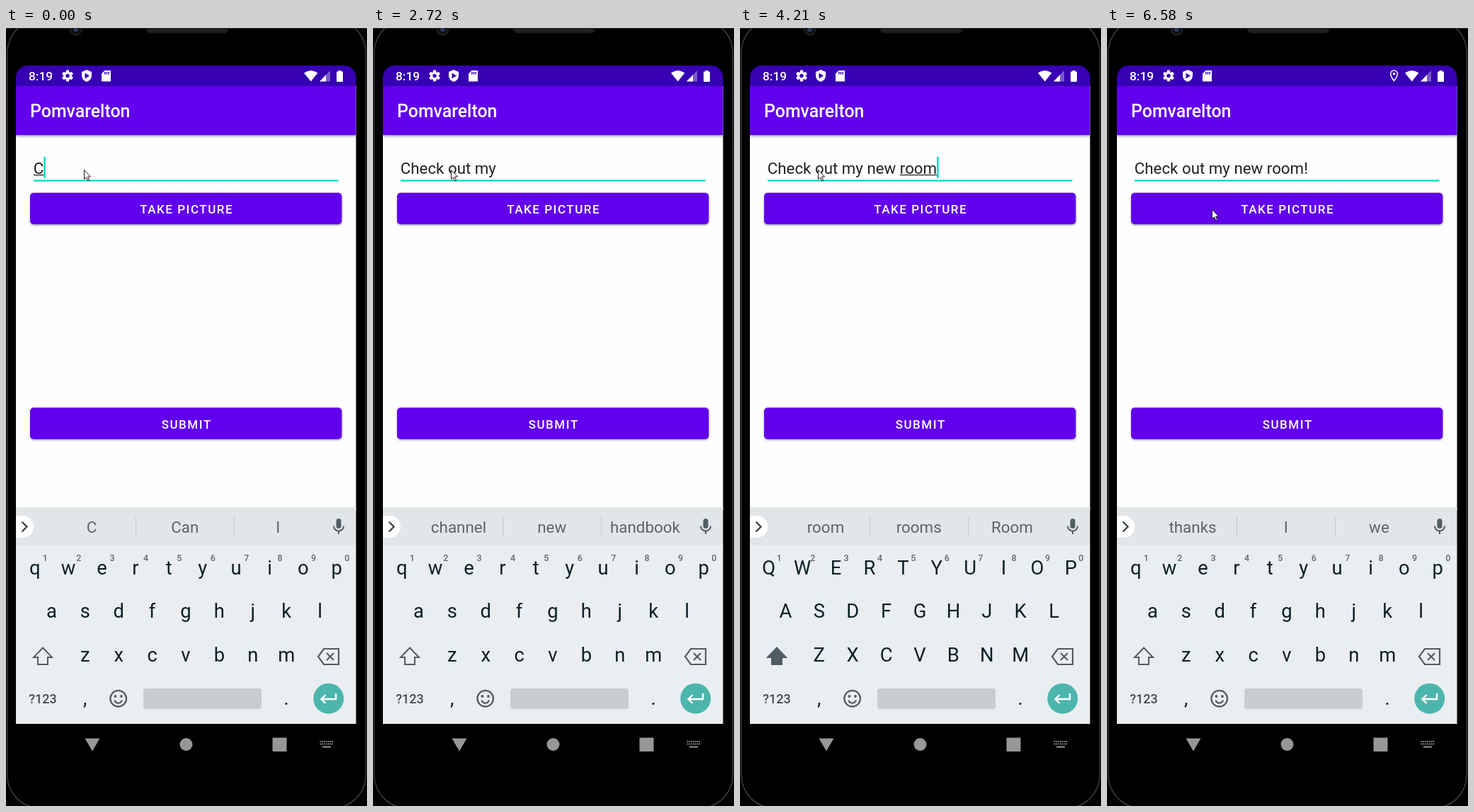
These frames come from a looping animation (510x1099 px, 8 s). An HTML page with a canvas:

```html
<!DOCTYPE html>
<html lang="en">
<head>
<meta charset="utf-8">
<title>New post</title>
<style>
html, body { margin: 0; width: 100%; height: 100%; overflow: hidden; background: #000; }
canvas { display: block; width: 510px; height: 1099px; }
</style>
</head>
<body>
<canvas id="stage" width="510" height="1099"></canvas>
<script>
const g = document.getElementById('stage').getContext('2d');
const LOOP = 8000;
const PURPLE = '#6200ee', DARK_PURPLE = '#3700b3', TEAL = '#03dac5';
const ICON = '#515d64', KEY = '#0c1f28';
const MID = 254, KEY_STEP = 47.4;

// time, typed text, suggestions (a leading * marks the bold one)
const typing = [
  [0, 'C', 'C', 'Can', 'I'],
  [250, 'Ch', 'Ch', 'Check', 'Chocolate'],
  [380, 'Che', 'Che', '*Check', 'Cheese'],
  [520, 'Chec', 'Chec', '*Check', 'Checking'],
  [650, 'Check', 'Check', 'Checks', 'Checked'],
  [960, 'Check ', 'in', 'with', 'out'],
  [1390, 'Check o', 'o', 'on', 'of'],
  [1660, 'Check out', 'out', 'outer', 'outta'],
  [1800, 'Check out ', 'the', 'my', 'this'],
  [2050, 'Check out m', 'm', '*my', 'more'],
  [2170, 'Check out my', 'my', 'mine', 'myself'],
  [2290, 'Check out my ', 'channel', 'new', 'handbook'],
  [3000, 'Check out my n', 'n', 'new', 'next'],
  [3270, 'Check out my ne', 'ne', '*new', 'next'],
  [3390, 'Check out my new', 'new', 'news', 'newest'],
  [3520, 'Check out my new ', 'channel', 'blog', 'website'],
  [3670, 'Check out my new r', 'r', 'red', 'room'],
  [3820, 'Check out my new ro', 'ro', 'road', 'room'],
  [3960, 'Check out my new roo', 'roo', '*roof', 'room'],
  [4080, 'Check out my new room', 'room', 'rooms', 'Room'],
  [4360, 'Check out my new room!', 'thanks', 'I', 'we']
];
const pointer = [[0, 110, 200], [5050, 135, 230], [5320, 139.5, 240], [5470, 148, 256]];
const caretOff = [[2720, 3000], [4760, 5320], [5730, LOOP]];

const at = (steps, t) => steps.filter(s => s[0] <= t).pop();
const within = (t, a, b) => t >= a && t < b;

function rect(x, y, w, h, color, r = 0) {
  g.fillStyle = color;
  g.beginPath();
  g.roundRect(x, y, w, h, r);
  g.fill();
}

function disc(x, y, r, color) {
  g.fillStyle = color;
  g.beginPath();
  g.arc(x, y, r, 0, 7);
  g.fill();
}

function trace(points, closed) {
  g.beginPath();
  points.forEach(([x, y]) => g.lineTo(x, y));
  if (closed) g.closePath();
}

function poly(points, color) {
  trace(points, true);
  g.fillStyle = color;
  g.fill();
}

function line(points, color, width, closed) {
  trace(points, closed);
  g.strokeStyle = color;
  g.lineWidth = width;
  g.stroke();
}

function label(s, x, y, size, color, weight = 400, align = 'center', spacing = 0) {
  g.font = `${weight} ${size}px Roboto, sans-serif`;
  g.letterSpacing = spacing + 'px';
  g.textAlign = align;
  g.fillStyle = color;
  g.fillText(s, x, y);
}

function shadow(color, blur, dy, draw) {
  g.save();
  g.shadowColor = color;
  g.shadowBlur = blur;
  g.shadowOffsetY = dy;
  draw();
  g.restore();
}

function phone() {
  rect(0, 0, 510, 1099, '#000');
  rect(1, -13, 508, 1116, '#3b3b3d', 48);
  rect(2.5, -11, 505, 1112, '#000', 46);
  rect(0, 0, 510, 1, '#2a2a2b');
  disc(98.5, 2, 9, '#1b1c20');
  disc(98.5, 2, 6, '#0b0c12');
  disc(98.5, 2, 3.5, '#29365c');
  rect(198, -6, 116, 13.5, '#1d1d1e', 6);
  for (let i = 0; i < 36; i++) rect(202 + i * 3, 1 + i % 2 * 2, 1.5, 1.5, '#333');

  const gray = '#979797';
  poly([[111.5, 1003.5], [132.5, 1003.5], [122, 1021.5]], gray);
  disc(254.5, 1012, 9, gray);
  rect(376.5, 1002.5, 20, 19.5, gray, 1);
  for (let i = 0; i < 7; i++) {
    rect(443.5 + i * 2.8, 1007, 1.8, 1.8, gray);
    rect(443.5 + i * 2.8, 1010.5, 1.8, 1.8, gray);
  }
  rect(447, 1014.5, 12, 2, gray);
}

function statusBar(t) {
  rect(14, 53, 480.5, 34, DARK_PURPLE, [17, 17, 0, 0]);
  label('8:19', 32, 74, 17.3, '#fff', 500, 'left');

  g.save();
  g.translate(87, 67.5);
  for (let i = 0; i < 3; i++) {
    rect(-2.2, -8, 4.4, 16, '#fff', 1);
    g.rotate(Math.PI / 3);
  }
  g.restore();
  disc(87, 67.5, 5.8, '#fff');
  disc(87, 67.5, 2.7, DARK_PURPLE);

  g.fillStyle = '#fff';
  g.beginPath();
  g.moveTo(114, 59);
  g.lineTo(121, 62);
  g.lineTo(121, 67);
  g.quadraticCurveTo(121, 73.5, 114, 76);
  g.quadraticCurveTo(107, 73.5, 107, 67);
  g.lineTo(107, 62);
  g.fill();
  poly([[111.5, 63.5], [118, 67.5], [111.5, 71.5]], DARK_PURPLE);

  poly([[139.5, 60], [148, 60], [148, 75.5], [135, 75.5], [135, 64.5]], '#fff');
  for (let i = 0; i < 3; i++) rect(139 + i * 2.7, 62, 1.5, 3.5, DARK_PURPLE);

  g.fillStyle = '#fff';
  g.beginPath();
  g.moveTo(430.7, 75.5);
  g.lineTo(421, 63.5);
  g.quadraticCurveTo(430.7, 56.5, 440.4, 63.5);
  g.fill();
  poly([[458, 60], [458, 75.5], [443, 75.5]], 'rgba(255,255,255,.35)');
  poly([[452, 66.2], [452, 75.5], [443, 75.5]], '#fff');
  rect(467, 61.5, 9, 14.5, '#fff', 1);
  rect(469.5, 60, 4, 2, '#fff');

  if (t >= 6580) {
    g.strokeStyle = '#fff';
    g.lineWidth = 1.5;
    g.beginPath();
    g.arc(405.5, 64.7, 4.8, Math.PI, 0);
    g.quadraticCurveTo(410.3, 68.5, 405.5, 74.5);
    g.quadraticCurveTo(400.7, 68.5, 400.7, 64.7);
    g.stroke();
    disc(405.5, 64.7, 1.8, '#fff');
  }
}

function button(text, y, h, raised) {
  shadow('rgba(0,0,0,.35)', raised ? 6 : 3, raised ? 3 : 1.5,
    () => rect(34, y, 440.4, h, PURPLE, 5));
  label(text, MID + 1.2, y + 29.3, 17, '#fff', 500, 'center', 1.54);
}

function ripple(t) {
  if (!within(t, 5730, 6580)) return;
  g.save();
  g.beginPath();
  g.roundRect(34, 232.7, 440.4, 44.6, 5);
  g.clip();
  rect(34, 232, 441, 46, `rgba(255,255,255,${t < 5870 ? .08 : .17})`);
  if (t < 5870) disc(185, 256, 130, 'rgba(255,255,255,.14)');
  g.restore();
}

function field(text, t) {
  const x = 38.8, base = 206;
  label(text, x, base, 22.3, '#212121', 400, 'left');
  const end = x + g.measureText(text).width;
  if (!/[ !]$/.test(text)) {
    const start = x + g.measureText(text.slice(0, text.lastIndexOf(' ') + 1)).width;
    rect(start, 207, end - start, 1.3, '#212121');
  }
  rect(39, 214.4, 430.5, 2.4, TEAL);
  if (!caretOff.some(([a, b]) => within(t, a, b))) rect(end, 182, 2.5, 30, TEAL);
}

function suggestions(words) {
  rect(14, 677, 480.5, 55, '#e2e6e9');
  words.forEach((w, i) => {
    const bold = w[0] === '*';
    label(bold ? w.slice(1) : w, 121 + i * 131.7, 713, 22.4,
      bold ? '#000' : '#5b656b', bold ? 700 : 400);
  });
  rect(183, 690, 1, 29, '#c3c8cc');
  rect(322, 690, 1, 29, '#c3c8cc');
  rect(14, 689, 25, 31, '#fff', [0, 15, 15, 0]);
  line([[22.5, 697.5], [29.5, 704.5], [22.5, 711.5]], '#37434a', 2.3);

  rect(466.5, 693, 7, 14, ICON, 3.5);
  g.strokeStyle = ICON;
  g.lineWidth = 2;
  g.beginPath();
  g.arc(470, 703.5, 7, 0, Math.PI);
  g.stroke();
  rect(469, 710, 2, 5, ICON);
}

function keyRow(keys, y, size = 27.4, color = KEY, weight = 400, shift = 0) {
  const x = MID + shift - (keys.length - 1) / 2 * KEY_STEP;
  [...keys].forEach((c, i) => label(c, x + i * KEY_STEP, y, size, color, weight));
}

function keyboard(upper) {
  rect(14, 731, 480.5, 252, '#eaeef1');
  ['qwertyuiop', 'asdfghjkl', 'zxcvbnm', ',     .'].forEach((row, i) =>
    keyRow(upper ? row.toUpperCase() : row, 771.5 + i * 61.5, 27.4));
  keyRow('1234567890', 753, 12.5, '#5f696f', 500, 14.6);

  const arrow = [[52, 875.5], [65, 889], [59, 889], [59, 899], [45, 899], [45, 889], [39, 889]];
  if (upper) poly(arrow, ICON);
  line(arrow, ICON, 2, true);
  line([[441, 888], [449, 877], [470, 877], [470, 899], [449, 899]], ICON, 2.2, true);
  line([[453, 883], [463, 893]], ICON, 2.2);
  line([[463, 883], [453, 893]], ICON, 2.2);

  label('?123', 52, 953.5, 18, '#414d54', 500);

  g.strokeStyle = ICON;
  g.lineWidth = 2.3;
  g.beginPath();
  g.arc(158.7, 947.2, 11.3, 0, 7);
  g.stroke();
  disc(154.4, 944, 1.9, ICON);
  disc(163, 944, 1.9, ICON);
  g.beginPath();
  g.arc(158.7, 948, 5.6, .3, Math.PI - .3);
  g.stroke();

  rect(194, 933, 167, 29, '#c8cdd1', 4);
  disc(455.7, 947.2, 21.5, '#4db6ac');
  line([[466, 940], [466, 948], [445.5, 948]], '#fff', 2.4);
  line([[451.5, 942], [445.5, 948], [451.5, 954]], '#fff', 2.4);
}

function mouse(x, y) {
  g.save();
  g.translate(x + .5, y + .5);
  const shape = [[0, 0], [0, 13.2], [3, 10.5], [5.2, 15.3], [7.2, 14.4], [5, 9.8], [9, 9.6]];
  poly(shape, '#fff');
  line(shape, '#1a1a1a', 1, true);
  g.restore();
}

function draw(t) {
  const [, text, ...words] = at(typing, t);
  const [, mx, my] = at(pointer, t);
  phone();
  statusBar(t);
  rect(14, 82, 480.5, 600, '#fefefe');
  g.save();
  g.beginPath();
  g.rect(14, 82, 480.5, 90);
  g.clip();
  shadow('rgba(0,0,0,.35)', 4, 1.5, () => rect(14, 82, 480.5, 69.3, PURPLE));
  g.restore();
  label('Pomvarelton', 34, 126, 24.9, '#fff', 500, 'left');
  field(text, t);
  button('TAKE PICTURE', 232.7, 44.6, within(t, 5730, 5870));
  ripple(t);
  button('SUBMIT', 536.2, 44.6, false);
  suggestions(words);
  keyboard(within(t, 4210, 4360));
  mouse(mx, my);
}

const begin = performance.now();
function tick() {
  draw((performance.now() - begin) % LOOP);
  requestAnimationFrame(tick);
}
tick();
</script>
</body>
</html>
```
